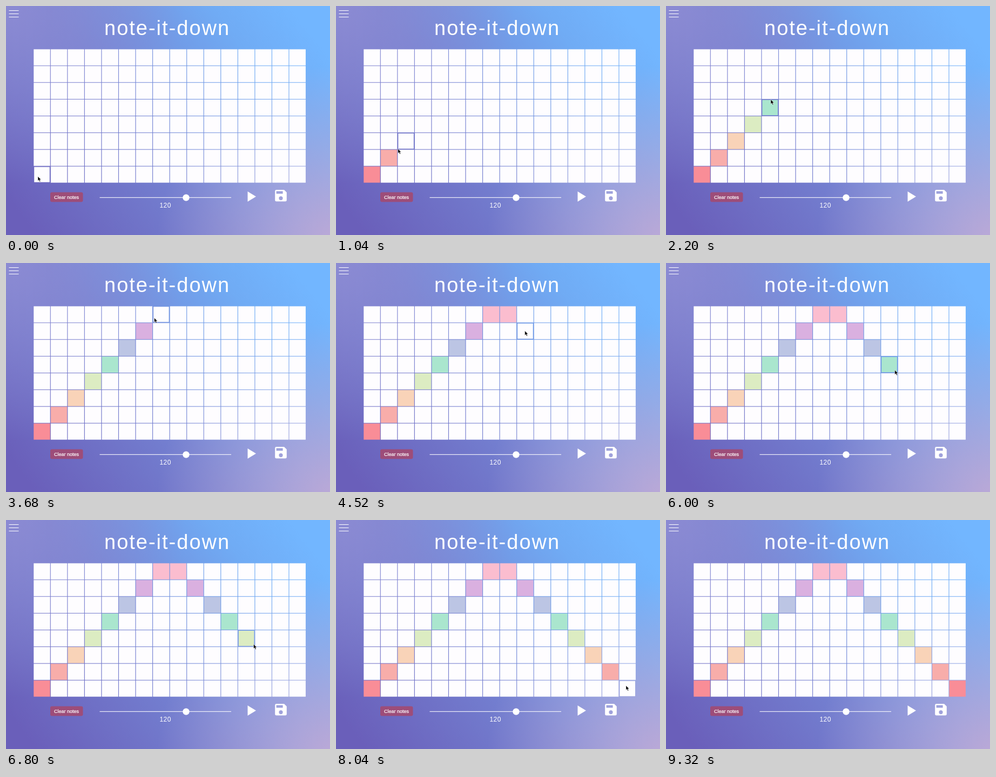
These frames come from a looping animation (600 px wide and 426 px high, 9.36 s). An HTML page:

```html
<!DOCTYPE html>
<html lang="en">
<head>
<meta charset="utf-8">
<title>note-it-down</title>
<style>
  html, body { margin: 0; width: 100%; height: 100%; overflow: hidden; }
  svg {
    display: block; width: 100%; height: 100%;
    font-family: "Liberation Sans", Arial, sans-serif;
    background:
      radial-gradient(circle at 102% 104%, #bea9d6, #bea9d600 44%),
      radial-gradient(circle at 0 0, #8c8bd3, #8c8bd300 45%),
      linear-gradient(52deg, #6a5fba 6%, #7482d2 44%, #70abf4 76%, #72b6ff 92%);
  }
</style>
</head>
<body>
<svg viewBox="0 0 600 426" fill="#fff">
  <path d="M5.5 8.5h18M5.5 14.5h18M5.5 20.5h18" stroke="#fff" stroke-width="1.2"/>
  <text x="182" y="54" font-size="38" letter-spacing="2">note-it-down</text>
  <g id="grid"></g>
  <rect x="82" y="346.5" width="60.5" height="18" rx="3" fill="#9d4d79"/>
  <text x="89" y="359" font-size="9" stroke="#fff" stroke-width=".2">Clear notes</text>
  <path d="M173.5 356.3h243.5" stroke="#fff" stroke-opacity=".85" stroke-width="1.2"/>
  <circle cx="333.5" cy="356.5" r="6.2"/>
  <text x="284.5" y="375" font-size="12" letter-spacing=".4">120</text>
  <path d="M447.5 345l15.500 9.500-15.500 9.500z"/>
  <path transform="translate(494.6 338.400) scale(1.2)" fill-rule="evenodd"
    d="M17 3H5a2 2 0 0 0-2 2v14a2 2 0 0 0 2 2h14a2 2 0 0 0 2-2V7zM12 19a3 3 0 1 1 0-6 3 3 0 0 1 0 6zM15 9H5V5h10z"/>
  <path id="cursor" d="M0 0v8.300l1.900-1.700 1.400 3.200 1.500-.7-1.400-3h2.500z"
    fill="#000" stroke="#fff" stroke-width=".5"/>
</svg>
<script>
const LOOP = 9360, COLS = 16, ROWS = 8;
const LEFT = 51.3, TOP = 80.5, STEP_X = 31.55, STEP_Y = 31.15, CELL_W = 30.4, CELL_H = 30.1;
const BLANK = "#fefdff";
const rowColors = ["#fbbdcf", "#dab0e0", "#bcc5e4", "#aae6ce", "#dcecc2", "#f9d3b8", "#f8adaa", "#f98d97"];

// When each column's note is clicked
const clicks = [320, 820, 1260, 1660, 2040, 2640, 3180, 3840, 4200, 4640, 5060, 5700, 6440, 7060, 7520, 8200];
const noteRow = col => col < ROWS ? ROWS - 1 - col : col - ROWS;

// Cursor path: a short pause on every note, plus a few passing points [time, x, y]
const path = [
  [0, 59, 317], [2200, 194, 174], [3680, 274.5, 102], [5320, 392, 179],
  [6800, 458.5, 231], [8040, 537, 308], [8500, 537, 308], [9000, 612, 350], [LOOP, 612, 350]
];
clicks.forEach((time, col) => {
  const first = col === 0, last = col === COLS - 1;
  const x = first ? 59 : last ? 537 : LEFT + STEP_X * col + 15;
  const y = first ? 317 : last ? 308 : TOP + STEP_Y * noteRow(col) + 15;
  path.push([time - 100, x, y], [time + 90, x, y]);
});
path.sort((a, b) => a[0] - b[0]);

const grid = document.getElementById("grid");
const cursor = document.getElementById("cursor");
const cells = [];
for (let row = 0; row < ROWS; row++) {
  for (let col = 0; col < COLS; col++) {
    const rect = document.createElementNS(grid.namespaceURI, "rect");
    grid.append(rect);
    cells.push({ rect, row, col, x: LEFT + col * STEP_X, y: TOP + row * STEP_Y });
  }
}

function cursorAt(time) {
  const next = path.findIndex(point => point[0] > time);
  const [t0, x0, y0] = path[next - 1], [t1, x1, y1] = path[next];
  const u = (time - t0) / (t1 - t0), ease = u * u * (3 - 2 * u);
  return [x0 + (x1 - x0) * ease, y0 + (y1 - y0) * ease];
}

function setAttrs(element, attrs) {
  for (const name in attrs) element.setAttribute(name, attrs[name]);
}

function draw(now) {
  const time = now % LOOP;
  const [px, py] = cursorAt(time);
  setAttrs(cursor, { transform: `translate(${px} ${py})` });
  for (const { rect, row, col, x, y } of cells) {
    const hovered = px >= x && px < x + CELL_W && py >= y && py < y + CELL_H;
    const inset = hovered ? 0.9 : 0;
    const filled = row === noteRow(col) && time >= clicks[col];
    setAttrs(rect, {
      x: x + inset, y: y + inset,
      width: CELL_W - 2 * inset, height: CELL_H - 2 * inset,
      fill: filled ? rowColors[row] : BLANK
    });
  }
  requestAnimationFrame(() => draw(performance.now()));
}
draw(performance.now());
</script>
</body>
</html>
```
